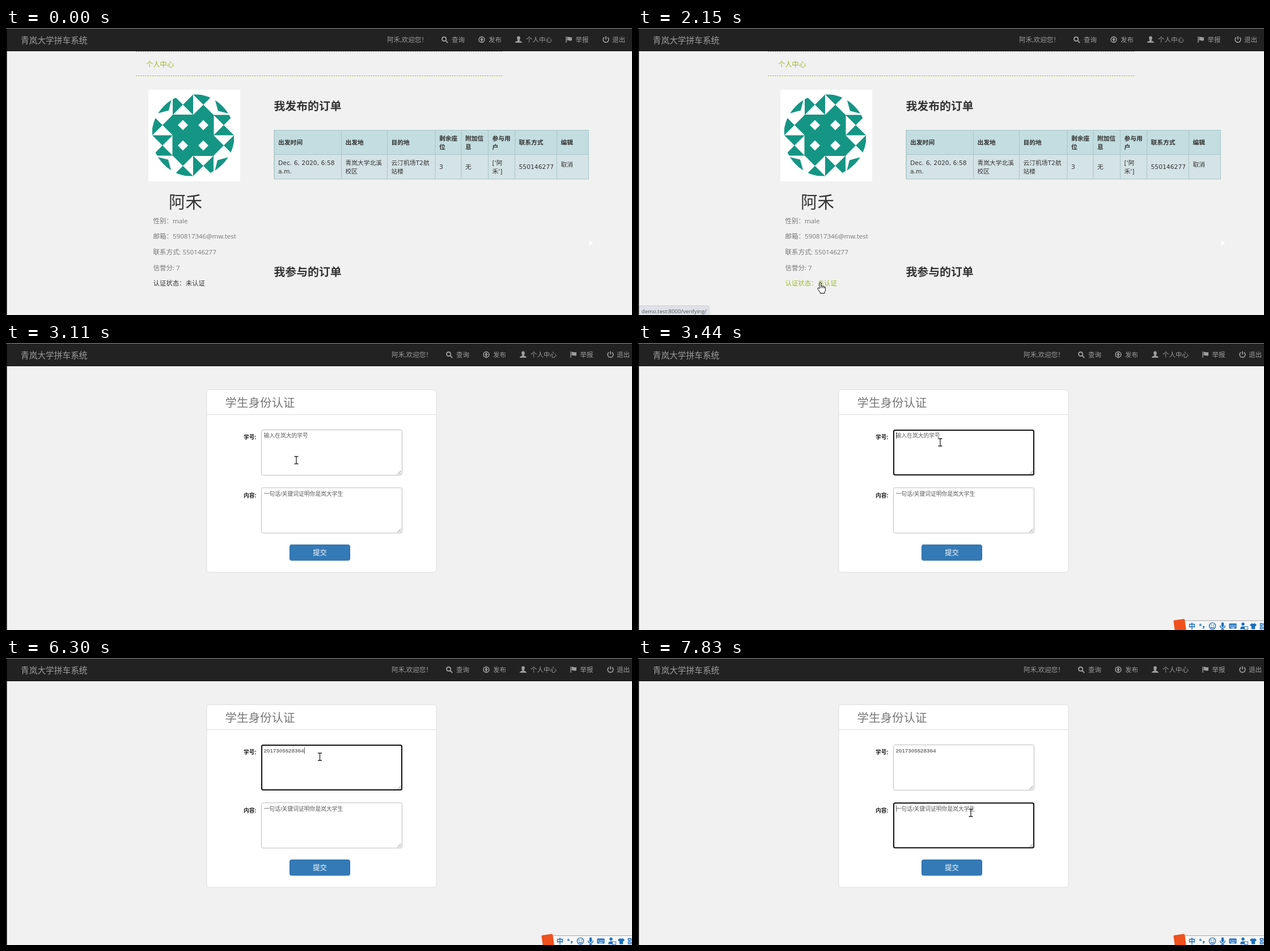
Write an HTML page that moves like this. It is 1104 by 507 pixels and loops after 7.99 s.

```html
<!DOCTYPE html>
<html lang="zh-CN">
<head>
<meta charset="utf-8">
<style>
html, body { margin: 0; width: 100%; height: 100%; overflow: hidden; background: #f1f1f1; }
svg { display: block; width: 1104px; height: 507px; }
text { font-family: 'Open Sans', 'Noto Sans CJK SC', sans-serif; white-space: pre; }
.cell { font-family: 'DejaVu Sans', 'Noto Sans CJK SC', sans-serif; }
.input { font-family: 'Liberation Sans', 'Noto Sans CJK SC', sans-serif; }
</style>
</head>
<body>
<svg id="stage" viewBox="0 0 1104 507"></svg>
<script>
const LOOP = 7990, USER = '阿禾', PHONE = '550146277', STUDENT = '2017305528364';
const GREEN = '#9cb92c', BLUE = '#1a6fc0', TEAL = '#159584', NAV_GREY = '#9d9d9d';

// Text is placed by its left edge and the middle of its CJK glyphs.
const text = (x, cy, str, size, fill, attrs = '') =>
  `<text x="${x}" y="${cy + size * .38}" font-size="${size}" fill="${fill}" ${attrs}>${str}</text>`;
const rect = (x, y, w, h, fill, attrs = '') =>
  `<rect x="${x}" y="${y}" width="${w}" height="${h}" fill="${fill}" ${attrs}/>`;
const path = (d, fill, attrs = '') => `<path d="${d}" fill="${fill}" ${attrs}/>`;
const line = (d, width = 1.6, color = NAV_GREY) =>
  path(d, 'none', `stroke="${color}" stroke-width="${width}"`);
const group = (content, attrs) => `<g ${attrs}>${content}</g>`;
const move = (x, y, content) => group(content, `transform="translate(${x} ${y})"`);

function navbar() {
  const icons = [
    [774, line('M-5 -1a3.6 3.6 0 1 0 7.2 0a3.6 3.6 0 1 0 -7.2 0M1.2 1.6L5.2 5.6', 2)],
    [839, line('M-4.9 0a4.9 4.9 0 1 0 9.8 0a4.9 4.9 0 1 0 -9.8 0') +
      path('M0 -3.5L3.2 .2H1.2V3.3H-1.2V.2H-3.2Z', NAV_GREY)],
    [904, path('M0 -6C2.4 -6 3.2 -4 2.8 -2C2.5 0 1.6 .4 1.6 1.4C2 2.6 6 2.6 6 5.4H-6C-6 2.6 -2 2.6 -1.6 1.4C-1.6 .4 -2.5 0 -2.8 -2C-3.2 -4 -2.4 -6 0 -6Z', NAV_GREY)],
    [993, path('M-5.6 -5.5H-4.2V5.5H-5.6ZM-3.4 -4.5C-1 -6 .8 -2.8 5 -4.6V1.4C1.2 3.2 -.8 0 -3.4 1.6Z', NAV_GREY)],
    [1058, line('M-2.8 -4A4.9 4.9 0 1 0 2.8 -4M0 -6V0', 1.7)]
  ];
  const labels = [[672, USER + ',欢迎您！'], [786, '查询'], [851, '发布'], [917, '个人中心'], [1004.5, '举报'], [1069, '退出']];
  return rect(0, 0, 1104, 41, '#222') + rect(0, 0, 1104, 1, '#8c8c8c') + rect(0, 40, 1104, 1, '#101010') +
    text(26, 21, '青岚大学拼车系统', 14.7, NAV_GREY) +
    group(icons.map(([x, art]) => move(x, 20.5, art)).join('') +
      labels.map(([x, str]) => text(x, 21, str, 11.5, NAV_GREY)).join(''), 'id="menu"');
}

function avatar() {
  const quarter =
    path('M-36 -72V-36L0 -72V-36ZM0 -72H36L0 -36H36Z', TEAL) +
    path('M-72 -36L-36 -72L-43 -44Z', TEAL) +
    path('M-18 -27L-27 -18L-18 -9L-9 -18Z', '#fff');
  const turns = [0, 90, 180, 270].map(a => group(quarter, `transform="rotate(${a})"`)).join('');
  return rect(251, 109, 162, 162, '#fff') +
    '<clipPath id="round"><circle r="73"/></clipPath>' +
    move(330, 189.5, group(rect(-36.5, -36.5, 73, 73, TEAL) + turns, 'clip-path="url(#round)"'));
}

function orders() {
  const cols = [473, 591.5, 672.5, 757, 803, 850.5, 897.5, 971.5];
  const heads = ['出发时间', '出发地', '目的地', '剩余座|位', '附加信|息', '参与用|户', '联系方式', '编辑'];
  const cells = ['Dec. 6, 2020, 6:58|a.m.', '青岚大学北溪|校区', '云汀机场T2航|站楼', '3', '无',
    `['${USER[0]}|${USER[1]}']`, PHONE, '取消'];
  const row = (list, cy, attrs) => list.map((str, i) => {
    const lines = str.split('|');
    return lines.map((s, k) =>
      text(cols[i] + 7, cy + (k - (lines.length - 1) / 2) * 14.8 - (s === '取消' ? 4 : 0), s, 10.75, '#333', `class="cell" ${attrs}`)).join('');
  }).join('');
  return rect(473, 180.5, 554.5, 43, '#c3dde0') + rect(473, 223.5, 554.5, 43.5, '#d4e3e5') +
    line('M473 180.5H1027.5V267H473ZM473 223.5H1027.5' + cols.map(x => `M${x} 180.5V267`).join(''), 1, '#a9c6c9') +
    row(heads, 202.3, 'font-weight="700"') + row(cells, 245.4, '');
}

function profilePage() {
  const info = ['性别：male', '邮箱：590817346@mw.test', '联系方式: ' + PHONE, '信誉分: 7'];
  return path('M229 41.5H877M229 84.5H877', 'none', `stroke="${GREEN}" stroke-dasharray="2.46 1.64"`) +
    text(247, 64, '个人中心', 12.3, GREEN) + avatar() +
    text(287, 307, USER, 29.5, '#333') +
    info.map((s, i) => text(259.5, 340.5 + i * 27.6, s, 11.5, '#777')).join('') +
    text(259.5, 451, '认证状态：未认证', 11.45, '#333', 'id="verify"') +
    text(472.5, 137, '我发布的订单', 19.85, '#333', 'font-weight="700"') +
    text(472.5, 430, '我参与的订单', 19.85, '#333', 'font-weight="700"') +
    orders() + rect(1028, 377, 6, 6, '#fff');
}

function field(id, y, label, hint) {
  return text(419, y + 13.5, label, 9.8, '#222', 'font-weight="700"') +
    rect(450.5, y + .5, 248, 80, '#fff', 'rx="3" stroke="#bbb"') +
    line(`M690.5 ${y + 79}l6 -6M694 ${y + 79}l2.5 -2.5`, 1, '#777') +
    rect(451, y + 1, 247, 79, 'none', `id="focus${id}" rx="2.5" stroke="#111" stroke-width="2"`) +
    text(454.5, y + 10.5, hint, 9.8, '#5c5c5c', `id="hint${id}" class="input"`);
}

function formPage() {
  return rect(354, 82.5, 405, 322.5, '#fff', 'rx="4" stroke="#ddd"') +
    line('M354 126.5H759', 1, '#ddd') +
    text(386.5, 105, '学生身份认证', 20.5, '#777') +
    field(1, 153, '学号:', '输入在岚大的学号') +
    field(2, 255.3, '内容:', '一句话/关键词证明你是岚大学生') +
    text(454.5, 163, '', 9.8, '#777', 'id="typed" class="input" font-weight="700"') +
    rect(0, 0, 1, 11, '#555', 'id="caret"') +
    rect(500.5, 356.5, 106, 27.5, '#337ab7', 'rx="3" stroke="#2e6da4"') +
    text(541.2, 370, '提交', 12.3, '#fff');
}

function inputBar() {
  const ink = (d, w = 1.4) => line(d, w, BLUE);
  const keys = [-4, -1.3, 1.3, 4].map(x => rect(x - .7, -2, 1.4, 1.4, '#fff') + rect(x - .7, .6, 1.4, 1.4, '#fff')).join('');
  const icons = [
    [995, ink('M-4.5 -2a1.4 1.4 0 1 0 2.8 0a1.4 1.4 0 1 0 -2.8 0', 1.2) + path('M1.2 0H4V2.5L1.8 5H.8L2 2.6H1.2Z', BLUE)],
    [1013, ink('M-5.6 0a5.6 5.6 0 1 0 11.2 0a5.6 5.6 0 1 0 -11.2 0M-3 1.2Q0 5 3 1.2M-2 -2.8V-.8M2 -2.8V-.8')],
    [1031, rect(-2.2, -6.5, 4.4, 8.5, BLUE, 'rx="2.2"') + ink('M-4.2 -1V0Q-4 3.6 0 3.6T4.2 0V-1M0 3.6V6M-2.6 6H2.6')],
    [1049, rect(-6.5, -4.5, 13, 9, BLUE, 'rx="1"') + keys + rect(-3, 2.6, 6, 1, '#fff')],
    [1068, `<circle cx="-1" cy="-3.5" r="2.7" fill="${BLUE}"/>` + path('M-6 5.5Q-6 .5 -1 .5Q2 .5 3 2V5.5Z', BLUE) +
      rect(1.5, 1, 6, 5, '#fff', `stroke="${BLUE}"`)],
    [1085, path('M-2.5 -5Q0 -3 2.5 -5L6 -2L4.2 .6L3.2 0V5.5H-3.2V0L-4.2 .6L-6 -2Z', BLUE)],
    [1101.5, ink('M-4 -4.5h3.5v3.5h-3.5zM-4 1.5h3.5v3.5h-3.5zM2 -4.5h3.5v3.5h-3.5zM2 1.5h3.5v3.5h-3.5z')]
  ];
  return rect(955, 490, 149, 17, '#f7f7f7') + rect(955, 490, 149, 1, '#aaa') +
    rect(945.5, 488.5, 20, 20, '#f0501e', 'rx="2" transform="rotate(-8 955.5 498.5)"') +
    text(971, 500, '中', 12, BLUE, 'font-weight="700"') +
    icons.map(([x, art]) => move(x, 500, art)).join('');
}

const pointers = {
  arrow: path('M0 0V15.5L3.6 12.2L6 18L8.4 17L6 11.4H11Z', '#fff', 'stroke="#000"'),
  hand: path('M-1.5 11V1.5Q-1.5 0 0 0T1.5 1.5V6.5Q3.4 5.3 4.3 7Q6 6 6.8 7.7Q9 7 9 9.5V13.5Q9 15.5 7.6 17V19H-.4V17.2L-4.4 12Q-5.3 10.4 -4 9.7Q-3 9.3 -1.5 11ZM1.5 6.5V10M4.3 7V10M6.8 7.7V10.4',
    '#fff', 'stroke="#000" stroke-linejoin="round"'),
  beam: path('M-3.5 -6.5H-1Q0 -6.5 0 -5.5Q0 -6.5 1 -6.5H3.5M0 -5.5V5.5M-3.5 6.5H-1Q0 6.5 0 5.5Q0 6.5 1 6.5H3.5', 'none', 'stroke="#222" stroke-width="1.3"')
};

const stage = document.getElementById('stage');
stage.innerHTML = rect(0, 0, 1104, 507, '#f1f1f1') +
  group(profilePage(), 'id="profile"') + group(formPage(), 'id="form"') + navbar() +
  group(rect(-4, 490.5, 130, 24, '#dee1e6', 'rx="4" stroke="#cfd2d7"') +
    text(6, 500, 'demo.test:8000/verifying/', 9.6, '#50545a'), 'id="status"') +
  rect(0, 1, 1.6, 506, '#000') + group(inputBar(), 'id="ime"') +
  '<circle id="click" r="10" fill="#efff00" fill-opacity=".47"/>' +
  Object.entries(pointers).map(([kind, art]) => group(art, `id="${kind}"`)).join('');

const el = {};
stage.querySelectorAll('[id]').forEach(node => el[node.id] = node);

const track = [
  [260, 1013, 488, 'arrow'], [420, 905, 452, 'arrow'], [580, 748, 420, 'arrow'], [740, 596, 409, 'arrow'],
  [900, 474, 422, 'arrow'], [1070, 384, 438, 'arrow'], [1230, 331, 446, 'hand'], [1360, 325, 447, 'hand'],
  [1520, 322, 449, 'hand'], [1680, 321.5, 449.5, 'hand'],
  [2610, 332, 443, 'arrow'], [2770, 385, 390, 'arrow'], [2930, 458, 292, 'arrow'], [3100, 512, 207, 'beam'],
  [3280, 533, 175.5, 'beam'], [3550, 536, 175.5, 'beam'], [3710, 543, 175, 'beam'], [3870, 548, 175, 'beam'],
  [4510, 551.5, 174.8, 'beam'], [5030, 553.5, 174.5, 'beam'],
  [6890, 554, 179, 'beam'], [7050, 558, 197, 'beam'], [7210, 568, 224, 'beam'], [7360, 579, 242, 'arrow'],
  [7520, 586, 268, 'beam'], [7680, 587, 273.5, 'beam']
];
// [start, digits typed]
const typing = [[4350, 1], [4510, 2], [4670, 3], [4870, 4], [5190, 5], [5350, 6], [5480, 8], [5650, 9], [5950, 10], [6110, 12], [6300, 13]];

const latest = (list, t) => list.filter(step => step[0] <= t).pop();
const within = (t, a, b) => t >= a && t < b;
const show = (node, on) => node.setAttribute('display', on ? 'inline' : 'none');
const place = (node, x, y) => node.setAttribute('transform', `translate(${x} ${y})`);

function draw(t) {
  const onForm = t >= 2450;
  show(el.profile, !onForm);
  show(el.form, onForm);
  place(el.menu, onForm ? 8 : 0, 0);
  el.verify.setAttribute('fill', t < 1230 ? '#333' : t < 1360 ? '#71822f' : GREEN);
  show(el.status, within(t, 1360, 2610));
  el.status.setAttribute('opacity', onForm ? .7 : t < 1520 ? .6 : 1);
  show(el.ime, t >= 3440);

  const count = (latest(typing, t) || [0, 0])[1];
  const second = t >= 7680;
  el.typed.textContent = STUDENT.slice(0, count);
  show(el.hint1, !count);
  show(el.focus1, within(t, 3280, 7680));
  show(el.focus2, second);
  show(el.caret, t >= 3280 && !within(t, 3870, 4350));
  place(el.caret, second ? 455 : 455 + Math.round(count * 5.45), second ? 260.5 : 158);

  const step = latest(track, t);
  for (const kind in pointers) show(el[kind], step && step[3] === kind);
  show(el.click, within(t, 1990, 2150) || within(t, 3280, 3440) || within(t, 7680, 7830));
  if (step) {
    place(el[step[3]], step[1], step[2]);
    place(el.click, step[1], step[2]);
  }
}

function tick() {
  draw(performance.now() % LOOP);
  requestAnimationFrame(tick);
}
tick();
</script>
</body>
</html>
```
